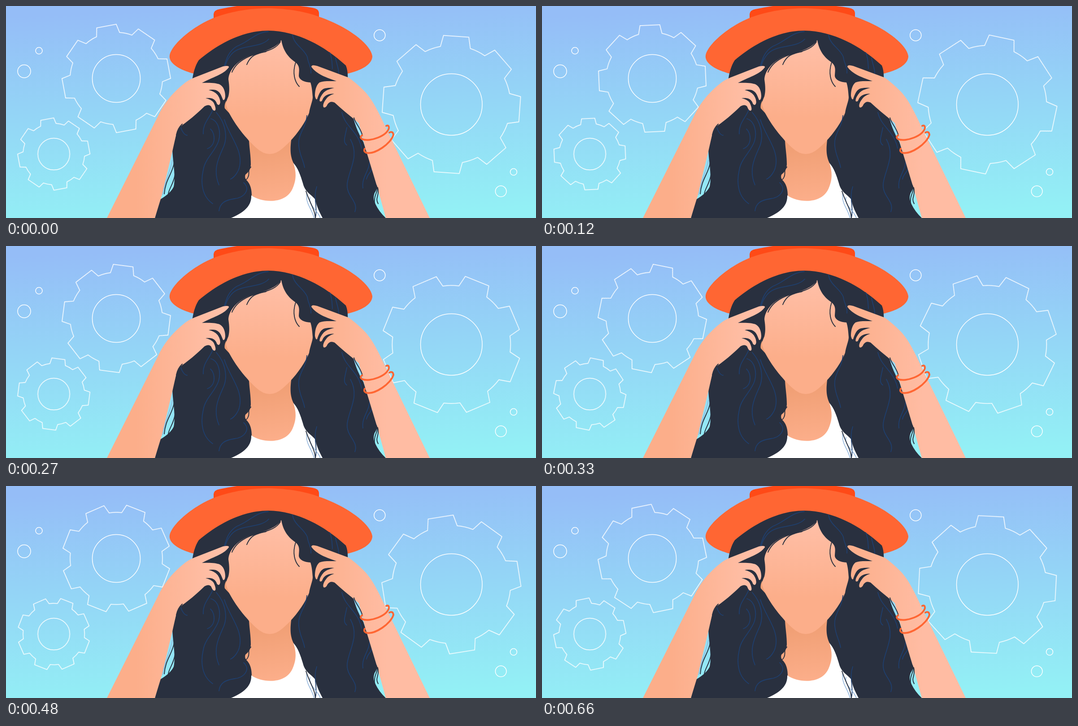
Animation, 1182 px wide and 474 px high, one loop 0.69 s. Source, as an HTML page:

```html
<!DOCTYPE html>
<html lang="en">
<head>
<meta charset="utf-8">
<title>Thinking</title>
<style>
  html, body { margin: 0; width: 100%; height: 100%; overflow: hidden; }
  svg { display: block; width: 100%; height: 100%; }
  .line { fill: none; stroke: #fff; stroke-width: 1.5; }
  .tooth-ring { animation: turn 690ms steps(23) infinite; transform-origin: 0 0; }
  @keyframes turn {
    from { transform: rotate(var(--start)); }
    to { transform: rotate(calc(var(--start) + 46deg)); }
  }
  .hair { fill: #29303f; }
  .strand { fill: none; stroke: #29303f; stroke-width: 1.9; stroke-linecap: round; }
  .shine { fill: none; stroke: #1f3f6e; stroke-width: 1.8; stroke-linecap: round; }
  .pale { fill: none; stroke: #8fb4dc; stroke-width: 1.6; stroke-linecap: round; }
  .bracelet { fill: none; stroke: #ff6633; stroke-width: 4; stroke-linecap: round; }
</style>
</head>
<body>
<svg viewBox="0 0 1182 474" preserveAspectRatio="none">
  <defs>
    <linearGradient id="sky" gradientUnits="userSpaceOnUse" x1="580" y1="0" x2="600" y2="474">
      <stop offset="0" stop-color="#95bdf7"/>
      <stop offset="1" stop-color="#93f0f5"/>
    </linearGradient>
    <linearGradient id="face" gradientUnits="userSpaceOnUse" x1="588" y1="80" x2="588" y2="250">
      <stop offset="0" stop-color="#ffbfa7"/>
      <stop offset="1" stop-color="#fcae8a"/>
    </linearGradient>
    <linearGradient id="neck" gradientUnits="userSpaceOnUse" x1="580" y1="320" x2="592" y2="435">
      <stop offset="0" stop-color="#f1a076"/>
      <stop offset="1" stop-color="#fcae8a"/>
    </linearGradient>
    <linearGradient id="leftArm" gradientUnits="userSpaceOnUse" x1="290" y1="0" x2="470" y2="0">
      <stop offset="0" stop-color="#fcae8a"/>
      <stop offset="1" stop-color="#ffbfa7"/>
    </linearGradient>
    <linearGradient id="rightArm" gradientUnits="userSpaceOnUse" x1="700" y1="0" x2="850" y2="0">
      <stop offset="0" stop-color="#fcb08d"/>
      <stop offset="1" stop-color="#ffbca3"/>
    </linearGradient>
  </defs>

  <rect width="1182" height="474" fill="url(#sky)"/>
  <g id="gears"></g>
  <g class="line">
    <circle cx="73.5" cy="100" r="7.5"/>
    <circle cx="40.5" cy="146" r="14.5"/>
    <circle cx="833.3" cy="65.5" r="12.5"/>
    <circle cx="1132" cy="371" r="7.5"/>
    <circle cx="1103.7" cy="414.3" r="12.3"/>
  </g>

  <!-- hat -->
  <path fill="#ff4a17" d="M463 30V18Q464 9 476 7Q500 2 522-1H646Q668 1 684 4Q697 6 698 15V30Z"/>
  <path fill="#ff6633" d="M418 151C385 142 362 127 365 110C371 82 425 40 470 24C510 10 550 5 586 5C630 6 670 13 698 24C760 45 813 84 817 112C817 130 795 143 763 151L600 140Z"/>

  <!-- hair -->
  <path class="hair" d="M416 161C419 143 424 130 430 121C476 82 530 55 585 55C650 56 710 89 758 133Q763 146 762 162L760 239L775 251C779 268 786 285 797 304L828 400Q829 408 822 418Q817 431 824 443Q832 460 847 474H332L343 433Q367 419 374 404C379 380 372 350 371 320L380 285L388 270Z"/>

  <!-- neck and top -->
  <path fill="#fff" d="M502 474C525 464 548 450 547 424L600 390L641 351C651 362 657 379 662 396C667 417 681 421 690 433C693 450 700 462 706 474Z"/>
  <path fill="url(#neck)" d="M538 295H636V300C634 318 633 334 641 351C649 375 646 391 640 406C627 442 575 442 548 424C548 410 545 399 538 391Q531 385 534 377Q546 368 546 354C546 335 543 320 542 302Z"/>
  <path class="strand" d="M546 360C538 368 544 374 540 382Q537 389 534 388"/>
  <path fill="#f1a076" d="M491 212C487 220 487 226 488 229L501 243Z"/>

  <!-- face -->
  <path fill="url(#face)" d="M614 76C605 92 580 101 548 110C517 120 497 143 496 164C498 178 499 190 496 202C492 211 490 217 491 222L498 240C514 270 536 297 558 317Q587 344 616 319C643 297 667 262 676 239C678 225 684 212 684 204C683 190 682 180 679 171C665 170 655 166 653 157C653 145 657 136 646 126C632 117 618 102 614 76Z"/>
  <g class="strand">
    <path d="M612 80C600 99 576 101 561 107C548 111 541 121 537 131"/>
    <path d="M580 102C550 107 515 120 504 148"/>
    <path d="M646 126C638 150 644 170 654 180"/>
  </g>

  <g class="shine">
    <path d="M585 57C555 60 545 78 515 90C493 103 490 125 484 144"/>
    <path d="M586 74C566 96 520 84 501 110C491 122 488 134 488 146"/>
    <path d="M639 65C643 88 665 95 672 114C674 130 682 137 680 150"/>
    <path d="M722 104C728 118 727 130 728 140M735 116C737 130 742 138 742 150"/>
    <path d="M461 232C455 250 438 262 440 286M390 272C393 282 399 289 404 289"/>
    <path d="M457 252C474 257 480 282 474 302C466 326 444 341 440 366C433 397 438 426 461 442"/>
    <path d="M456 275C467 285 469 311 449 319"/>
    <path d="M469 238C490 262 494 292 486 313C475 338 460 365 475 400"/>
    <path d="M487 254C497 288 525 318 522 351C521 370 509 383 501 387"/>
    <path d="M530 395C546 409 533 428 509 431C488 434 477 441 475 458"/>
    <path d="M671 245C669 273 650 286 653 313C655 334 663 344 666 361"/>
    <path d="M749 238C756 270 786 280 793 318"/>
    <path d="M760 272C757 290 750 304 760 311"/>
    <path d="M768 298C789 336 765 365 761 397C758 426 787 436 778 460"/>
    <path d="M796 407C792 382 814 365 811 341M804 387C806 374 818 370 817 358"/>
    <path d="M693 404C684 430 696 448 690 474"/>
  </g>
  <g class="pale">
    <path d="M671 419C667 442 683 454 687 474M678 428C674 447 696 457 701 474"/>
    <path d="M371 345C367 371 354 389 349 422"/>
  </g>
  <path class="strand" d="M669 414C678 442 689 455 690 474"/>

  <!-- arms -->
  <path fill="url(#leftArm)" d="M225 474L340 244C350 223 366 199 394 176Q405 166 420 160L484 135Q498 132 497 137C485 154 460 159 437 172C455 171 468 172 476 175C486 180 489 192 489 202Q488 212 484 210C480 200 478 192 468 188Q460 186 452 188Q466 191 472 199C479 209 479 219 475 221Q471 222 469 215C464 206 457 205 445 206Q458 209 463 216C469 228 468 234 465 234C461 234 459 228 457 224Q452 219 443 224C425 242 405 258 388 270L380 285L371 325L347 425L332 474Z"/>
  <path fill="url(#rightArm)" d="M945 474L850 278C842 261 836 248 828 233C820 217 811 203 800 191C789 180 777 169 764 160L694 134Q681 130 681 136C693 153 715 160 737 168C722 168 708 167 699 171C691 178 689 190 689 201Q691 211 694 208C698 196 702 186 712 184Q722 182 732 183Q715 187 709 193C701 202 698 211 700 213Q704 215 706 209C710 200 718 196 732 196Q718 201 714 208C706 218 706 227 710 227Q714 227 717 220Q723 211 733 216C750 232 768 246 787 262L801 316L830 412L847 474Z"/>

  <g class="strand">
    <path d="M375 350C372 374 355 388 353 420M377 377C373 399 364 407 362 420"/>
    <path d="M776 250C780 265 791 272 795 290M393 264Q383 273 380 288"/>
    <path d="M826 401C833 415 817 424 823 445M829 406C834 424 822 429 830 442"/>
  </g>

  <g class="bracelet">
    <path d="M848 268Q854 265 854 273C849 291 812 304 795 298Q788 294 794 289"/>
    <path d="M855 283Q863 279 864 288C859 307 823 333 803 328Q797 325 800 319"/>
  </g>
</svg>
<script>
  const TEETH = 8, ROOT = 0.85, TIP_HALF = 10.5, ROOT_HALF = 14.7;

  function gearPath(radius) {
    const root = radius * ROOT;
    const point = (r, degrees) => {
      const a = degrees * Math.PI / 180;
      return `${(r * Math.sin(a)).toFixed(2)} ${(-r * Math.cos(a)).toFixed(2)}`;
    };
    let path = `M${point(root, -ROOT_HALF)}`;
    for (let i = 0; i < TEETH; i++) {
      const mid = i * 360 / TEETH;
      path += `L${point(radius, mid - TIP_HALF)}L${point(radius, mid + TIP_HALF)}`
        + `L${point(root, mid + ROOT_HALF)}`
        + `A${root} ${root} 0 0 1 ${point(root, mid + 360 / TEETH - ROOT_HALF)}`;
    }
    return path + 'Z';
  }

  const gear = ({ x, y, radius, hole, start }) =>
    `<g class="line" transform="translate(${x} ${y})">
      <path class="tooth-ring" style="--start:${start}deg" d="${gearPath(radius)}"/>
      <circle r="${hole}"/>
    </g>`;

  document.getElementById('gears').innerHTML = [
    { x: 246, y: 162, radius: 121.2, hole: 53.5, start: -10.6 },
    { x: 106.6, y: 331, radius: 80.8, hole: 35.6, start: -10.6 },
    { x: 993.3, y: 220.2, radius: 155.3, hole: 68.8, start: 4 },
  ].map(gear).join('');
</script>
</body>
</html>
```
